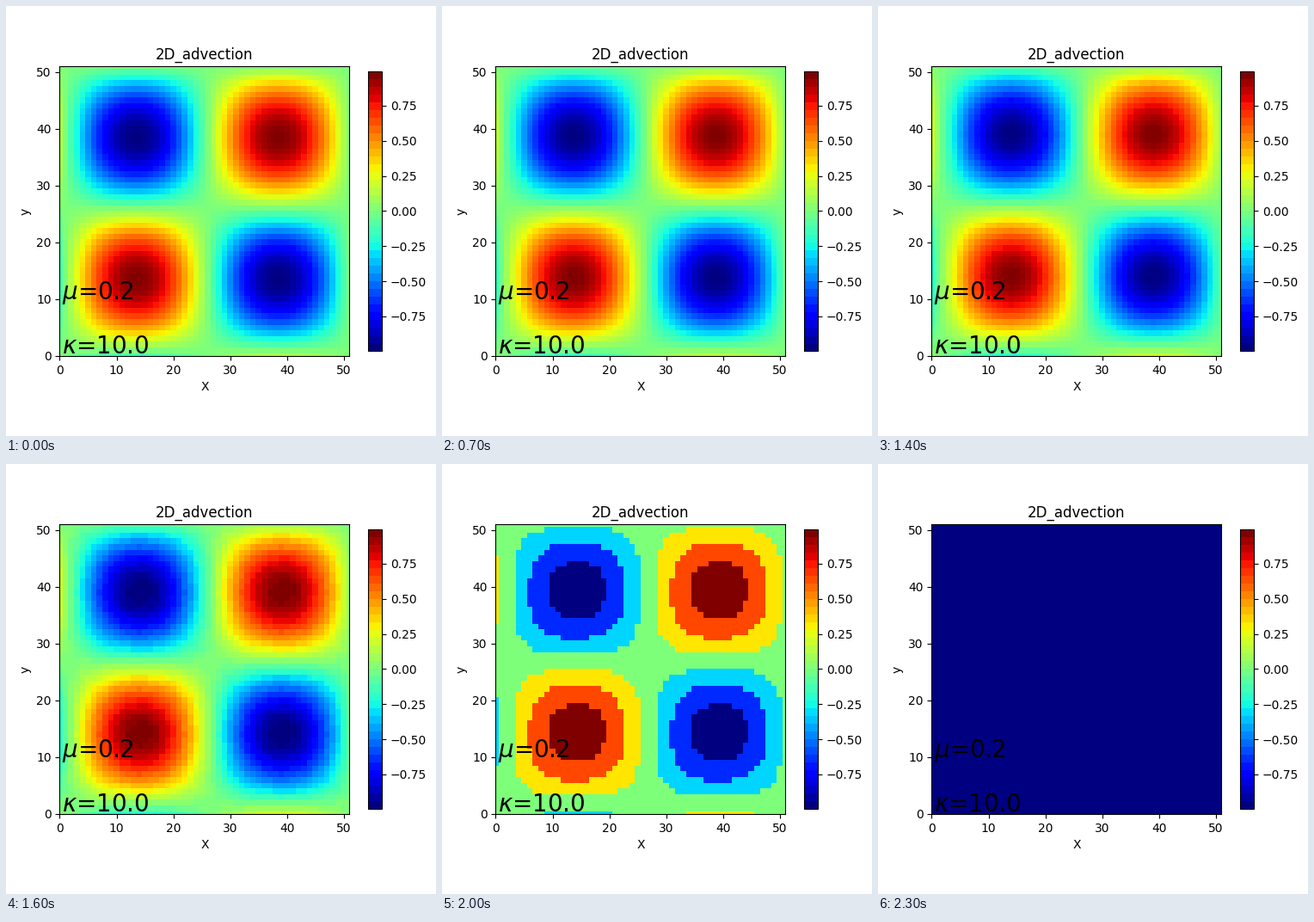
Write a matplotlib script that moves like this. It is 500 by 500 pixels and loops after 3070 ms.

```python
import numpy as np
import matplotlib.pyplot as plt
from matplotlib.animation import FuncAnimation
from matplotlib.cm import ScalarMappable
from matplotlib.colors import Normalize

SIZE = 500
TICK = 10            # ms per animation frame
LOOP = 3070          # ms
STEP = 100           # ms between solver outputs
LAST = 23            # final solver output, held until the loop ends

PERIOD = 50          # cells, plus one ghost cell on each side
SPEED = 0.04         # cells travelled per output
DECAY = 1.65         # amplitude ratio between outputs
AMP = 3.64           # amplitude at output 20, in smallest representable units
LOSS = 0.5           # units lost to rounding

cells = np.arange(PERIOD + 2)


def field(step):
    """Advected, decaying wave rounded to whole units and scaled to [-1, 1]."""
    wave = np.sin(2 * np.pi * (cells - 1 - SPEED * step) / PERIOD)
    amp = AMP * DECAY ** (20 - step) - LOSS
    units = np.round(amp * np.outer(wave, wave))
    peak = np.abs(units).max()
    return units / peak if peak else np.full_like(units, -1)


def px_axes(left, top, width, height):
    return fig.add_axes([left / SIZE, 1 - (top + height) / SIZE,
                         width / SIZE, height / SIZE])


fig = plt.figure(figsize=(SIZE / 100, SIZE / 100), dpi=100)
ax = px_axes(62.45, 69.95, 336.9, 336.9)
cax = px_axes(421, 75.7, 16.25, 325.4)

mesh = ax.pcolormesh(cells, cells, field(0), cmap="jet", vmin=-1, vmax=1,
                     shading="nearest")
ax.set(xlim=(0, 51), ylim=(0, 51), xlabel="X", ylabel="y",
       title="2D_advection",
       xticks=range(0, 51, 10), yticks=range(0, 51, 10))
ax.text(0.4, 10, r"$\mu$=0.2", fontsize=20)
ax.text(0.4, 0.4, r"$\kappa$=10.0", fontsize=20)

top = np.cos(np.pi / PERIOD) ** 2
scale = ScalarMappable(Normalize(-top, top), plt.get_cmap("jet", 36))
fig.colorbar(scale, cax=cax, ticks=np.arange(-0.75, 0.8, 0.25))


def update(i):
    mesh.set_array(field(min(i * TICK // STEP, LAST)))
    return (mesh,)


anim = FuncAnimation(fig, update, frames=LOOP // TICK, interval=TICK,
                     repeat=True, repeat_delay=0)
plt.show()
```
